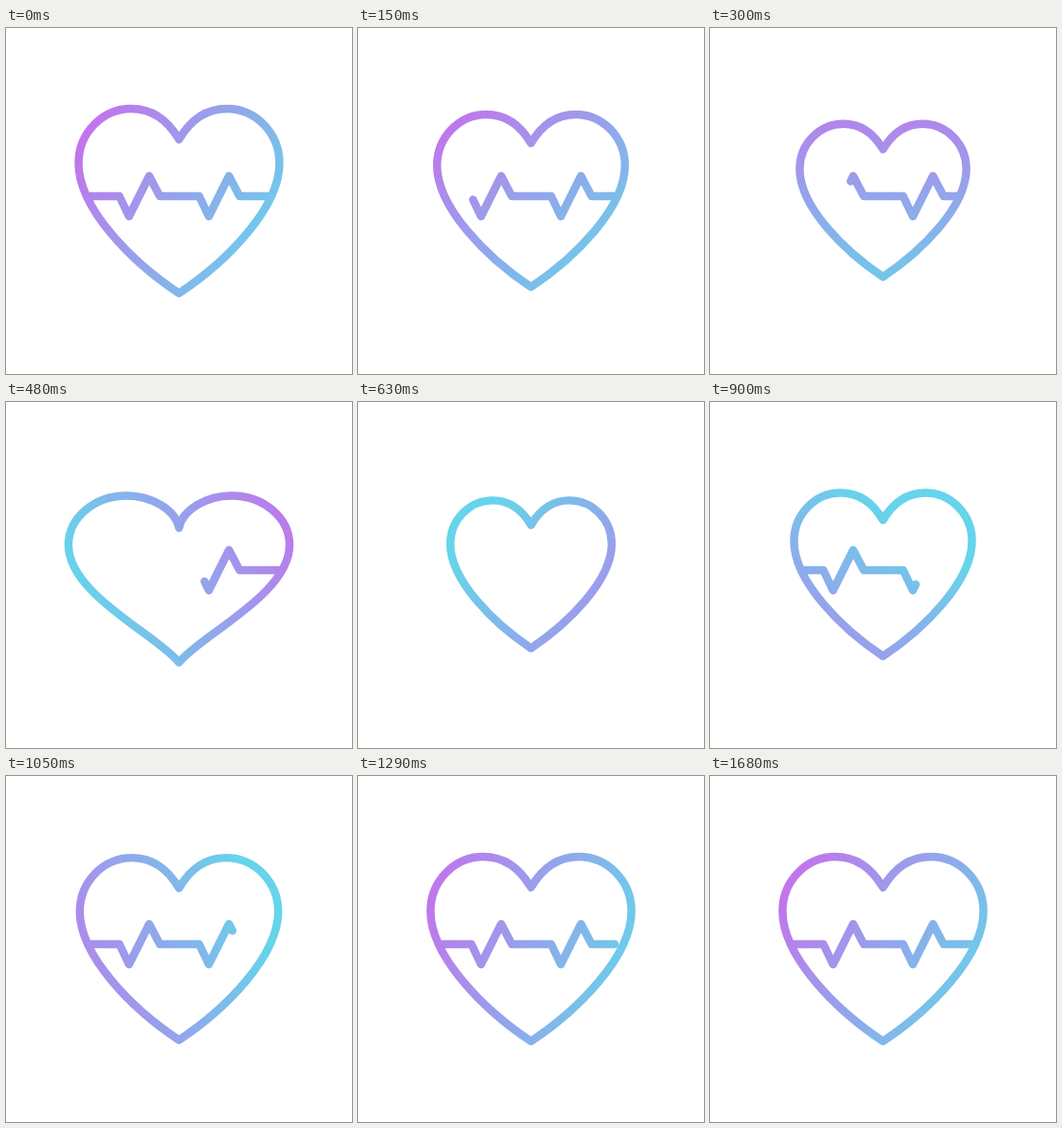
An HTML page that plays this animation: 360 px wide and 360 px high, repeating every 2.71 s.

```html
<!DOCTYPE html>
<html lang="en">
<head>
<meta charset="utf-8">
<title>Heartbeat</title>
<style>
  html, body { margin: 0; height: 100%; overflow: hidden; background: #fff; }
  svg { display: block; width: 100%; height: 100%; }
</style>
</head>
<body>
<svg viewBox="0 0 360 360">
  <defs>
    <linearGradient id="ink" gradientUnits="userSpaceOnUse">
      <stop offset="0" stop-color="#c274ec"/>
      <stop offset="1" stop-color="#66d4ea"/>
    </linearGradient>
    <clipPath id="inside"><path id="mask"/></clipPath>
  </defs>
  <g fill="none" stroke="url(#ink)" stroke-width="8.4" stroke-linecap="round" stroke-linejoin="round">
    <path id="heart"/>
    <g clip-path="url(#inside)">
      <path id="pulse" d="M62 175H118L128 196L149 154L160 175H201L211 196L232 154L243 175H298"/>
    </g>
  </g>
</svg>
<script>
const LOOP = 2710, STEP = 30, ACTIVE = 1680, REDRAW = 595, CX = 180, CY = 176;
const [ink, mask, heart, pulse] = ['ink', 'mask', 'heart', 'pulse'].map(id => document.getElementById(id));
const pulseLength = pulse.getTotalLength();
pulse.setAttribute('stroke-dasharray', pulseLength);

const mix = (a, b, k) => a + (b - a) * k;
const clamp = u => Math.min(1, Math.max(0, u));
const smooth = u => (u = clamp(u), u * u * (3 - 2 * u));
const bell = (t, center, width) => Math.exp(-(((t - center) / width) ** 2));

// One half from notch to tip is mirrored into the other; squash widens and pinches it.
function heartPath(scale, squash) {
  const width = mix(104.5 * scale, 115, squash);
  const top = mix(CY - 92 * scale, 97.5, squash);
  const notch = mix(CY - 60 * scale, 131, squash);
  const tip = mix(CY + 100 * scale, 271, squash);
  const height = tip - top, side = top + height * .295;
  const half = [
    [0, notch],
    [mix(.1, .03, squash), mix(notch, top, .56)], [.25, top], [.475, top],
    [.765, top], [1, mix(top, side, .45)], [1, side],
    [1, side + height * mix(.245, .295, squash)], [mix(.47, .21, squash), tip - height * .17], [0, tip]
  ];
  const left = half.map(([x, y]) => [CX - x * width, y]);
  const right = half.map(([x, y]) => [CX + x * width, y]).reverse();
  return `M${left[0]}C${left.slice(1).join(' ')}C${right.slice(1).join(' ')}Z`;
}

// From 0 to 1 the pulse is erased, from 1 to 2 it is drawn again.
function pulseTravel(t) {
  const u = t / REDRAW;
  return u < 1 ? .7 * u + .3 * u ** 10 : 2 - Math.exp((REDRAW - t) / 290);
}

function draw(now) {
  const t = Math.min(ACTIVE, Math.floor(now % LOOP / STEP) * STEP);

  const shrink = smooth(t / 395) * (1 - smooth((t - 729) / 378));
  const d = heartPath(1 - .2 * shrink, bell(t, 480, 70));
  heart.setAttribute('d', d);
  mask.setAttribute('d', d);
  pulse.setAttribute('stroke-dashoffset', -pulseTravel(t) * pulseLength);

  const turn = smooth(1 - (1 - t / ACTIVE) ** 1.5);
  const angle = (30 + 360 * turn) * Math.PI / 180;
  const shift = 75 * bell(t, 800, 270);
  [-120, 120].forEach((reach, i) => {
    ink.setAttribute('x' + (i + 1), CX + (reach - shift) * Math.cos(angle));
    ink.setAttribute('y' + (i + 1), CY + (reach - shift) * Math.sin(angle));
  });
}

const start = performance.now();
function tick() {
  draw(performance.now() - start);
  requestAnimationFrame(tick);
}
tick();
</script>
</body>
</html>
```
